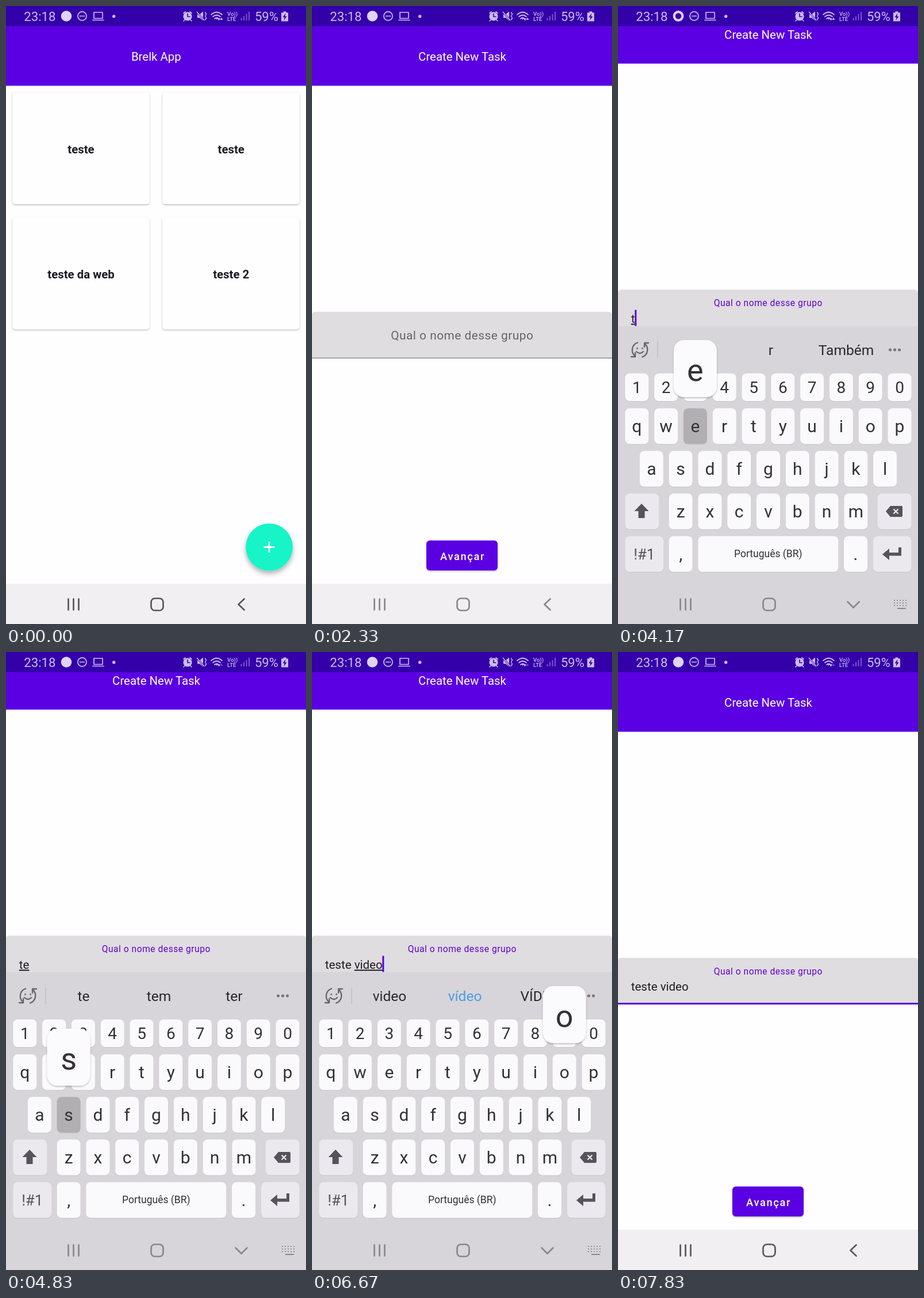
These frames come from a looping animation (522x1073 px, 8 s). An HTML page:

```html
<!DOCTYPE html>
<html lang="pt-BR">
<head>
<meta charset="utf-8">
<title>Task app</title>
<style>
html, body { margin: 0; width: 100%; height: 100%; overflow: hidden; background: #fefdff; }
svg { display: block; width: 522px; height: 1073px; }
text { font-family: Roboto, "Noto Sans", sans-serif; white-space: pre; }
.mid { text-anchor: middle; }
.line { fill: none; stroke-linecap: round; stroke-linejoin: round; }
</style>
</head>
<body>
<svg id="stage" viewBox="0 0 522 1073" xmlns="http://www.w3.org/2000/svg">
  <defs>
    <filter id="low" x="-10%" y="-10%" width="120%" height="125%"><feDropShadow dx="0" dy="1.5" stdDeviation="1.5" flood-opacity=".27"/></filter>
    <filter id="high" x="-30%" y="-30%" width="160%" height="170%"><feDropShadow dx="0" dy="5" stdDeviation="4.5" flood-opacity=".3"/></filter>
  </defs>
  <rect width="522" height="1073" fill="#fefdff"/>

  <g id="page">
    <rect y="35" width="522" height="103.5" fill="#5a00e3"/>
    <g id="home">
      <text class="mid" x="261.3" y="95" font-size="20.4" fill="#fff">Brelk App</text>
      <g id="cards"></g>
      <circle cx="458" cy="939.5" r="41" fill="#18f4c8" filter="url(#high)"/>
      <path d="M448.5 939.5h19M458 930v19" stroke="#fff" stroke-width="2.8"/>
    </g>
    <g id="create">
      <text class="mid" x="261.5" y="95" font-size="20.4" fill="#fff">Create New Task</text>
      <path d="M0 612v-75q0-6 6-6h510q6 0 6 6v75z" fill="#dfdde0"/>
      <rect id="underline" width="522"/>
      <text id="label" class="mid" x="261.3">Qual o nome desse grupo</text>
      <text id="field" x="22.8" y="588" font-size="20.5" fill="#1f1d22"><tspan id="done"></tspan><tspan id="word"></tspan></text>
      <rect id="cursor" y="566" width="3" height="28" fill="#5a00e3"/>
      <rect x="199" y="928" width="124" height="52" rx="6" fill="#5a00e3" filter="url(#low)"/>
      <text class="mid" x="262" y="961.5" font-size="18.3" font-weight="500" letter-spacing="1.6" fill="#fff">Avançar</text>
    </g>
  </g>

  <rect y="1003" width="522" height="70" fill="#f1eff2"/>

  <g id="keyboard">
    <rect y="556" width="522" height="517" fill="#d7d5d9"/>
    <g class="line" stroke="#66646a" stroke-width="2.3">
      <path d="M34 584.5a13.5 13.5 0 0 0-4 23.500M42 609.500a13.500 13.500 0 0 0 4-23.500M30 602v7h-7M46 592v-7h7M32 600q6 6 12 0"/>
      <path d="M33.500 594v1M42.500 594v1"/>
    </g>
    <path id="divider" d="M69 583v28" stroke="#bcbabf" stroke-width="1.300"/>
    <g id="tools" fill="#66646a">
      <circle cx="108" cy="597" r="13"/>
      <path d="M102 600q6 8 12 0z" fill="#d7d5d9"/>
      <path d="M173 585h25v15l-10 10h-15z"/>
      <rect x="250" y="584" width="26" height="26" rx="5"/>
      <text class="mid" x="263" y="602" font-size="12" font-weight="700" fill="#d7d5d9">GIF</text>
      <rect x="335.500" y="583" width="9" height="17" rx="4.500"/>
      <path d="M331 596a9 9 0 0 0 18 0M340 605v6" class="line" stroke="#66646a" stroke-width="2.300"/>
      <circle cx="417" cy="597" r="9" fill="none" stroke="#66646a" stroke-width="6"/>
      <circle cx="417" cy="597" r="12" fill="none" stroke="#66646a" stroke-width="3" stroke-dasharray="4.700"/>
    </g>
    <g id="hints" font-size="24.500"></g>
    <path d="M473.500 597h.1M481.500 597h.1M489.500 597h.1" class="line" stroke="#77757a" stroke-width="5"/>
    <g id="keys"></g>
    <path d="M41 864l12.500 13h-7v12h-11v-12h-7z" fill="#56545a"/>
    <path d="M466 877.500l8-9.500h19q2 0 2 2v15q0 2-2 2h-19z" fill="#56545a"/>
    <path d="M479.500 873.500l8 8m0-8l-8 8" stroke="#ebe9ee" stroke-width="2.300"/>
    <path d="M460 952l12-10v7h16v-9h5v14.500h-21v7.500z" fill="#56545a"/>
    <g id="popup">
      <rect x="-37.500" width="75" height="99" rx="18" fill="#fbfafd" filter="url(#low)"/>
      <text id="bigKey" class="mid" y="71" font-size="54" fill="#333036"></text>
    </g>
  </g>

  <g id="nav" class="line" stroke-width="2.700">
    <path d="M108.500 1029.500v19M117.500 1029.500v19M126.500 1029.500v19"/>
    <rect x="252.500" y="1028.500" width="21" height="21" rx="6.500"/>
    <path id="arrow"/>
    <path id="switcher" d="M481 1032h25M481 1036.500h25M481 1041h25" stroke-width="2.200" stroke-dasharray=".1 4.900"/>
    <path id="switchBar" d="M487 1046h13" stroke-width="2.200"/>
  </g>
  <rect id="ripple" x="350" y="1003" width="118" height="70" rx="35" fill="#77757a"/>

  <rect width="522" height="35" fill="#3400aa"/>
  <g fill="#cdbdf0" stroke="none">
    <text x="31.300" y="26" font-size="22.200">23:18</text>
    <text x="433" y="26" font-size="22">59%</text>
    <circle id="record" cx="105" cy="17.500" stroke="#dfd3f6"/>
    <circle cx="187.700" cy="18" r="2.700"/>
    <g class="line" stroke="#cdbdf0" stroke-width="1.700">
      <circle cx="132.500" cy="17.500" r="7.600"/>
      <path d="M128.500 17.500h8M153 21.500v-10.500h15v10.500zM151 24.500h19"/>
      <path d="M357 15q9.500-8.500 19 0M360 18.500q6.500-5.500 13 0M363 22q3.500-3 7 0"/>
      <path d="M346.500 11l2 3-2 3.500 2 3.500-2 3" stroke-width="1.400"/>
      <path d="M309 12.500l3-2.500M323 12.500l-3-2.500M311 24l-2 2M321 24l2 2"/>
    </g>
    <circle cx="316" cy="18" r="7.600"/>
    <path d="M316 13.500v5h4" class="line" stroke="#3400aa" stroke-width="1.700"/>
    <path d="M333 14.500h4l6-5v16l-6-5h-4zM366.500 23.500l-2.500-2h5z"/>
    <path d="M332 10l13 15" stroke="#3400aa" stroke-width="3"/>
    <path d="M332 10l13 15" stroke="#cdbdf0" stroke-width="1.500"/>
    <path d="M368 21.500h5l-2.500 4z"/>
    <path id="upload" d="M372.500 24h5l-2.500-4z"/>
    <text x="385" y="16.500" font-size="9.500" font-weight="500">Vo))</text>
    <text x="385" y="26" font-size="9.500" font-weight="500">LTE</text>
    <path d="M409.500 25v-4M414 25v-7.500M418.500 25v-11M423 25v-15" stroke="#cdbdf0" stroke-width="2" opacity=".45"/>
    <path d="M482.500 11.500v-2h5v2h3.500v15h-12v-15z"/>
    <path d="M486.500 12.500l-5 7h3l-1 5.500 5-7h-3z" fill="#3400aa"/>
  </g>
</svg>

<script>
const LOOP = 8000, PAN = 38.5, PITCH = 50.8;
const $ = id => document.getElementById(id);
const set = (el, attrs) => { for (const k in attrs) el.setAttribute(k, attrs[k]); return el; };
const add = (parent, tag, attrs, text = '') => {
  const el = set(document.createElementNS('http://www.w3.org/2000/svg', tag), attrs);
  el.textContent = text;
  return parent.appendChild(el);
};
const show = (el, on) => set(el, { opacity: +on });
const ramp = (t, from, to) => Math.min(1, Math.max(0, (t - from) / (to - from)));
const smooth = p => p * p * (3 - 2 * p);
const mix = (a, b, p) => a + (b - a) * p;
const mixColor = (a, b, p) => `rgb(${a.map((v, i) => Math.round(mix(v, b[i], p)))})`;

['teste', 'teste', 'teste da web', 'teste 2'].forEach((name, i) => {
  const x = 11 + 261.2 * (i % 2), y = 150 + 217.3 * (i >> 1);
  add($('cards'), 'rect', { x, y, width: 238.5, height: 194, rx: 5, fill: '#fefdff', filter: 'url(#low)' });
  add($('cards'), 'text', { class: 'mid', x: x + 119.5, y: y + 106, 'font-size': 20.4, 'font-weight': 700, fill: '#1e1b22' }, name);
});

const keys = {};
function addKey(name, x, y, w, h, { label = name, size = 30, base = 41.5, fill = '#faf9fc', ink = '#333036' } = {}) {
  add($('keys'), 'rect', { x, y: y + 1, width: w, height: h, rx: 8, fill: '#c6c4c8' });
  const rect = add($('keys'), 'rect', { x, y, width: w, height: h, rx: 8, fill });
  add($('keys'), 'text', { class: 'mid', x: x + w / 2, y: y + base, 'font-size': size, fill: ink }, label);
  keys[name] = { rect, x: x + w / 2, y, fill };
}
const addRow = (letters, x, y, h, opts) =>
  [...letters].forEach((c, i) => addKey(c, x + i * PITCH, y, 41, h, opts));
const dim = { label: '', fill: '#ebe9ee' };
addRow('1234567890', 12.3, 638, 48, { size: 28, base: 34 });
addRow('qwertyuiop', 12.3, 698.5, 62);
addRow('asdfghjkl', 37.8, 772.5, 62);
addRow('zxcvbnm', 88.6, 846.5, 62);
addKey('shift', 12.3, 846.5, 59, 62, dim);
addKey('back', 451.5, 846.5, 59, 62, dim);
addKey('sym', 12.3, 920.5, 67, 62, { ...dim, label: '!#1', size: 26, base: 40, ink: '#56545a' });
addKey(',', 88.6, 920.5, 41, 62);
addKey(' ', 139.3, 920.5, 244, 62, { label: 'Português (BR)', size: 17.5, base: 36.5 });
addKey('.', 393, 920.5, 41, 62);
addKey('enter', 444, 920.5, 66.5, 62, dim);

const hints = [135, 266, 397].map(x => add($('hints'), 'text', { class: 'mid', x, y: 606 }));

// Key press times; a letter lands when its key is let go.
const presses = [[3960, 't'], [4130, 'e'], [4760, 's'], [4880, 't'], [4990, 'e'], [5110, ' '],
  [5220, 'v'], [5330, 'i'], [5620, 'd'], [5850, 'e'], [6120, 'o']];
const RELEASE = 80, COMMIT = 95, POPUP = 150, FOCUS = 2900, CLOSE = 7250;
const suggestions = {
  't': 't r Também', 'te': 'te tem ter', 'tes': 'tes teste três', 'test': 'test teste tese',
  'teste': 'teste testes este', 'teste ': 'de do da', 'teste v': 'v c vai', 'teste vi': 'vi vou vim',
  'teste vid': 'vid vida vídeo', 'teste vide': 'vide vídeo vida', 'teste video': 'video vídeo VÍDEO'
};

function drawTyping(t) {
  const landed = presses.filter(([at]) => t >= at + COMMIT);
  const value = landed.map(p => p[1]).join('');
  const split = value.lastIndexOf(' ') + 1;
  $('done').textContent = value.slice(0, split);
  $('word').textContent = value.slice(split);
  set($('word'), { 'text-decoration': t < 7080 ? 'underline' : 'none' });

  const last = landed.length ? landed[landed.length - 1][0] + COMMIT : FOCUS;
  set($('cursor'), { x: 22.5 + (value ? $('field').getComputedTextLength() : 0) });
  show($('cursor'), t >= FOCUS && Math.floor((t - last) / 500) % 2 === 0);

  const words = (suggestions[value] || '').split(' ');
  hints.forEach((el, i) => {
    el.textContent = words[i] || '';
    set(el, { fill: value === 'teste video' && i === 1 ? '#4a9ce9' : '#29272c' });
  });
  show($('tools'), !value);
  show($('divider'), value);

  for (const k in keys) set(keys[k].rect, { fill: keys[k].fill });
  const press = presses.filter(([at]) => t >= at && t < at + POPUP).pop();
  show($('popup'), press && press[1] !== ' ');
  if (!press) return;
  const key = keys[press[1]];
  if (t < press[0] + RELEASE) set(key.rect, { fill: '#b1afb2' });
  set($('popup'), { transform: `translate(${key.x} ${key.y - 118.5})` });
  $('bigKey').textContent = press[1];
}

function drawNav(t) {
  const open = t >= 3300 && t < CLOSE;
  const fade = ramp(t, 700, 1000) - ramp(t, 7000, 7080);
  set($('nav'), { stroke: mixColor([88, 86, 91], [137, 135, 140], fade) });
  set($('arrow'), { d: open ? 'M399.500 1034.500l10 10 10-10' : 'M414.500 1029.500l-10 9.500 10 9.500' });
  show($('switcher'), open && t < 7170);
  show($('switchBar'), open && t < 7170);
  set($('ripple'), { opacity: 0.15 * (ramp(t, 7000, 7080) - ramp(t, 7170, 7400)) });
}

function draw(t) {
  const swap = smooth(ramp(t, 1850, 2200));
  set($('home'), { opacity: 1 - swap });
  set($('create'), { opacity: swap });

  const focus = smooth(ramp(t, FOCUS, FOCUS + 150));
  set($('label'), {
    y: mix(578.5, 559.5, focus), 'font-size': mix(20.8, 15.6, focus), 'letter-spacing': 0.52,
    fill: mixColor([102, 100, 104], [98, 0, 210], focus)
  });
  const thick = mix(1.4, 3, focus);
  set($('underline'), { y: 612 - thick, height: thick, fill: mixColor([138, 136, 140], [92, 0, 216], focus) });

  const rise = smooth(ramp(t, 3390, 3640)) - smooth(ramp(t, CLOSE, CLOSE + 200));
  const pan = smooth(ramp(t, 3450, 3680)) - smooth(ramp(t, CLOSE, CLOSE + 200));
  set($('keyboard'), { opacity: rise, transform: `translate(0 ${194 * (1 - rise)})` });
  set($('page'), { transform: `translate(0 ${-PAN * pan})` });

  const ring = t % 1200 >= 80 && t % 1200 < 610;
  set($('record'), ring ? { r: 7.3, fill: 'none', 'stroke-width': 4.2 } : { r: 9.3, fill: '#dfd3f6', 'stroke-width': 0 });
  set($('upload'), { opacity: (t > 80 && t < 2250) || t > 4700 ? 0.4 : 1 });
  drawTyping(t);
  drawNav(t);
}

const start = performance.now();
function tick() {
  draw((performance.now() - start) % LOOP);
  requestAnimationFrame(tick);
}
tick();
</script>
</body>
</html>
```
